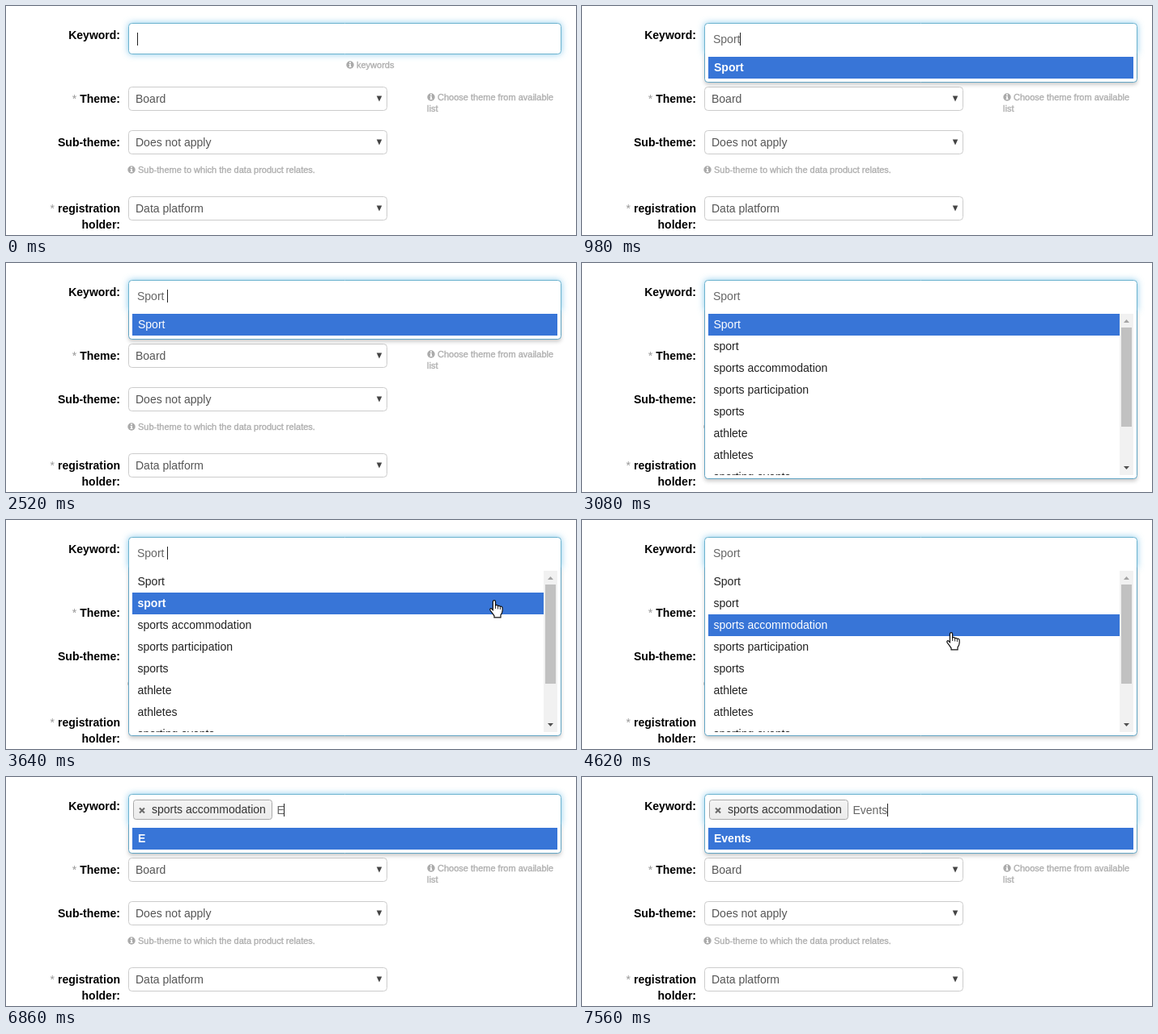
An HTML page with a canvas that plays this animation: 704 px wide and 284 px high, repeating every 8 s.

```html
<!DOCTYPE html>
<html lang="en">
<head>
<meta charset="utf-8">
<title>Keyword form</title>
<style>
html, body { margin: 0; width: 100%; height: 100%; overflow: hidden; background: #fff; }
canvas { display: block; width: 704px; height: 284px; }
</style>
</head>
<body>
<canvas id="stage" width="704" height="284"></canvas>
<script>
const ctx = document.getElementById('stage').getContext('2d');
const LOOP = 8000, STEP = 140;
const FACE = '"Liberation Sans", Arial, sans-serif';
const BLUE = '#3875d7', GREY = '#aeaeae', TAG = 'sports accommodation';
const ROWS = ['Sport', 'sport', TAG, 'sports participation', 'sports',
  'athlete', 'athletes', 'sporting events'];

const LIST_OPEN = 3080, PICKED = 4900;
const caretOff = [[140, 280], [1540, 1960], [2380, 2520], [2940, 3500],
  [4060, 4900], [5320, 5740], [6300, 6720]];
const pointer = [[3500, 626, 82], [3640, 597, 99], [4200, 472, 130],
  [4480, 468, 132], [4620, 450, 139], [4900, 450, 139]];

function text(str, x, y, color, style = '14px', align = 'left') {
  ctx.font = style + ' ' + FACE;
  ctx.textAlign = align;
  ctx.fillStyle = color;
  ctx.fillText(str, x, y);
}

function box(x, y, w, h, radius, fill, line) {
  ctx.beginPath();
  ctx.roundRect(x, y, w, h, radius);
  ctx.fillStyle = fill;
  ctx.fill();
  if (!line) return;
  ctx.shadowColor = 'transparent';
  ctx.strokeStyle = line;
  ctx.lineWidth = 1;
  ctx.stroke();
}

function rect(x, y, w, h, color) {
  ctx.fillStyle = color;
  ctx.fillRect(x, y, w, h);
}

function triangle(x, y, w, h, color) {
  ctx.beginPath();
  ctx.moveTo(x - w / 2, y - h / 2);
  ctx.lineTo(x + w / 2, y - h / 2);
  ctx.lineTo(x, y + h / 2);
  ctx.fillStyle = color;
  ctx.fill();
}

function label(str, y, required) {
  text(str, 141, y, '#000', 'bold 14px', 'right');
  if (required) text('*', 141 - ctx.measureText(str).width - 4, y, '#999', '14px', 'right');
}

function select(value, y) {
  box(151.5, y + .5, 319, 29, 4, '#fff', '#ccc');
  text(value, 160, y + 20, '#555');
  triangle(461, y + 15, 6.5, 7, '#444');
}

function note(str, x, y) {
  text(str, x, y, GREY, '11px');
  ctx.strokeStyle = GREY;
  ctx.lineWidth = .35;
  ctx.strokeText(str, x, y);
}

function help(str, x, y) {
  ctx.beginPath();
  ctx.arc(x + 5, y - 4, 4.7, 0, 7);
  ctx.fillStyle = '#aaa';
  ctx.fill();
  rect(x + 4, y - 7.5, 2, 1.6, '#fff');
  rect(x + 3.6, y - 5, 2.2, 1, '#fff');
  rect(x + 4.2, y - 5, 1.7, 4, '#fff');
  rect(x + 3.5, y - 2, 3.1, 1, '#fff');
  note(str, x + 13, y);
}

function form() {
  label('Keyword:', 41);
  help('keywords', 420, 77);
  label('Theme:', 120, true);
  select('Board', 100);
  help('Choose theme from available', 520, 117);
  note('list', 520, 131);
  label('Sub-theme:', 174);
  select('Does not apply', 154);
  help('Sub-theme to which the data product relates.', 150, 207);
  label('registration', 256, true);
  label('holder:', 276);
  select('Data platform', 236);
}

function tag() {
  const shade = ctx.createLinearGradient(0, 28, 0, 53);
  shade.addColorStop(0, '#f4f4f4');
  shade.addColorStop(1, '#ebebeb');
  box(157.5, 28.5, 171, 24, 3, shade, '#aaa');
  ctx.beginPath();
  for (const d of [-3, 3]) {
    ctx.moveTo(168 - d, 38.5);
    ctx.lineTo(168 + d, 44.5);
  }
  ctx.strokeStyle = '#6a6a6a';
  ctx.lineWidth = 2;
  ctx.stroke();
  text(TAG, 180, 45, '#333');
}

function field(typed, tagged, caret, open) {
  ctx.save();
  ctx.shadowColor = 'rgba(82,178,225,.75)';
  ctx.shadowBlur = 8;
  box(151.5, 21.5, 534, 38, open ? [4, 4, 0, 0] : 4, '#fff', '#6db3cf');
  ctx.restore();
  if (tagged) tag();
  const x = tagged ? 334.5 : 162;
  text(typed, x, 46, '#666');
  if (caret) rect(Math.floor(x + ctx.measureText(typed).width), 33, 1, 16, '#222');
}

function panel(bottom) {
  ctx.save();
  ctx.shadowColor = 'rgba(0,0,0,.22)';
  ctx.shadowBlur = 5;
  ctx.shadowOffsetY = 3;
  box(151.5, 58.5, 534, bottom - 58.5, [0, 0, 4, 4], '#fff', '#62a5c4');
  ctx.restore();
  rect(152, 56, 533, 5, '#fff');
}

function suggestion(str, bold) {
  panel(94.5);
  rect(156, 63, 525, 27, BLUE);
  text(str, 163, 81, '#fff', bold ? 'bold 14px' : '14px');
}

function scrollbar() {
  rect(664, 63, 17, 200, '#f1f1f1');
  rect(666, 80, 13, 123, '#c1c1c1');
  triangle(672.5, 72, 7, -4, '#a3a3a3');
  triangle(672.5, 254, 7, 4, '#505050');
}

function list(active) {
  panel(267.5);
  ctx.save();
  ctx.beginPath();
  ctx.rect(156, 63, 525, 200);
  ctx.clip();
  ROWS.forEach((row, i) => {
    const on = i === active;
    if (on) rect(156, 63 + 27 * i, 508, 27, BLUE);
    const exact = on && row === 'sport';
    text(row, 162.5, 81 + 27 * i, on ? '#fff' : '#222', exact ? 'bold 14px' : '14px');
  });
  scrollbar();
  ctx.restore();
}

const hand = new Path2D('M6 .7Q7.6.7 7.6 2.5V7Q8.5 6 10 6.8L10.6 7.7Q12 6.6 13.4 8.3' +
  'Q15 7.6 16 9.3Q16.6 13 15.6 16L14 19V21.8H6V19.8L3.4 16.2.9 12.8Q.3 10.8 2.2 10.6' +
  'L4.4 12.6V2.5Q4.4.7 6 .7Z');
const knuckles = new Path2D('M7.6 7V11M10.6 7.7V11.5M13.4 8.5V12');

function drawHand(x, y) {
  ctx.save();
  ctx.translate(x, y);
  ctx.fillStyle = '#fff';
  ctx.fill(hand);
  ctx.strokeStyle = '#111';
  ctx.lineWidth = 1.2;
  ctx.stroke(hand);
  ctx.lineWidth = .9;
  ctx.stroke(knuckles);
  ctx.restore();
}

function pointerAt(t) {
  const i = pointer.findIndex(p => p[0] > t);
  if (i < 1) return null;
  const [t0, x0, y0] = pointer[i - 1], [t1, x1, y1] = pointer[i];
  const k = (t - t0) / (t1 - t0);
  return [Math.round(x0 + (x1 - x0) * k), Math.round(y0 + (y1 - y0) * k)];
}

function typedAt(t) {
  if (t >= PICKED) return 'Events'.slice(0, Math.max(0, (t - 6720) / STEP));
  if (t >= 2520) return 'Sport ';
  if (t >= 980) return 'Sport';
  return 'Spor'.slice(0, Math.max(0, (t - 140) / STEP));
}

function draw(time) {
  const t = Math.floor(time / STEP + 1e-6) * STEP;
  const typed = typedAt(t), tagged = t >= PICKED;
  const open = t >= LIST_OPEN && !tagged;
  const caret = !caretOff.some(([a, b]) => t >= a && t < b);

  rect(0, 0, 704, 284, '#fff');
  form();
  field(typed, tagged, caret, typed !== '');
  if (open) {
    const p = pointerAt(t);
    list(p ? Math.floor((p[1] - 63) / 27) : 0);
    if (p) drawHand(...p);
  } else if (typed) {
    suggestion(typed.trim(), !typed.endsWith(' '));
  }
}

function tick() {
  draw(performance.now() % LOOP);
  requestAnimationFrame(tick);
}
tick();
</script>
</body>
</html>
```
